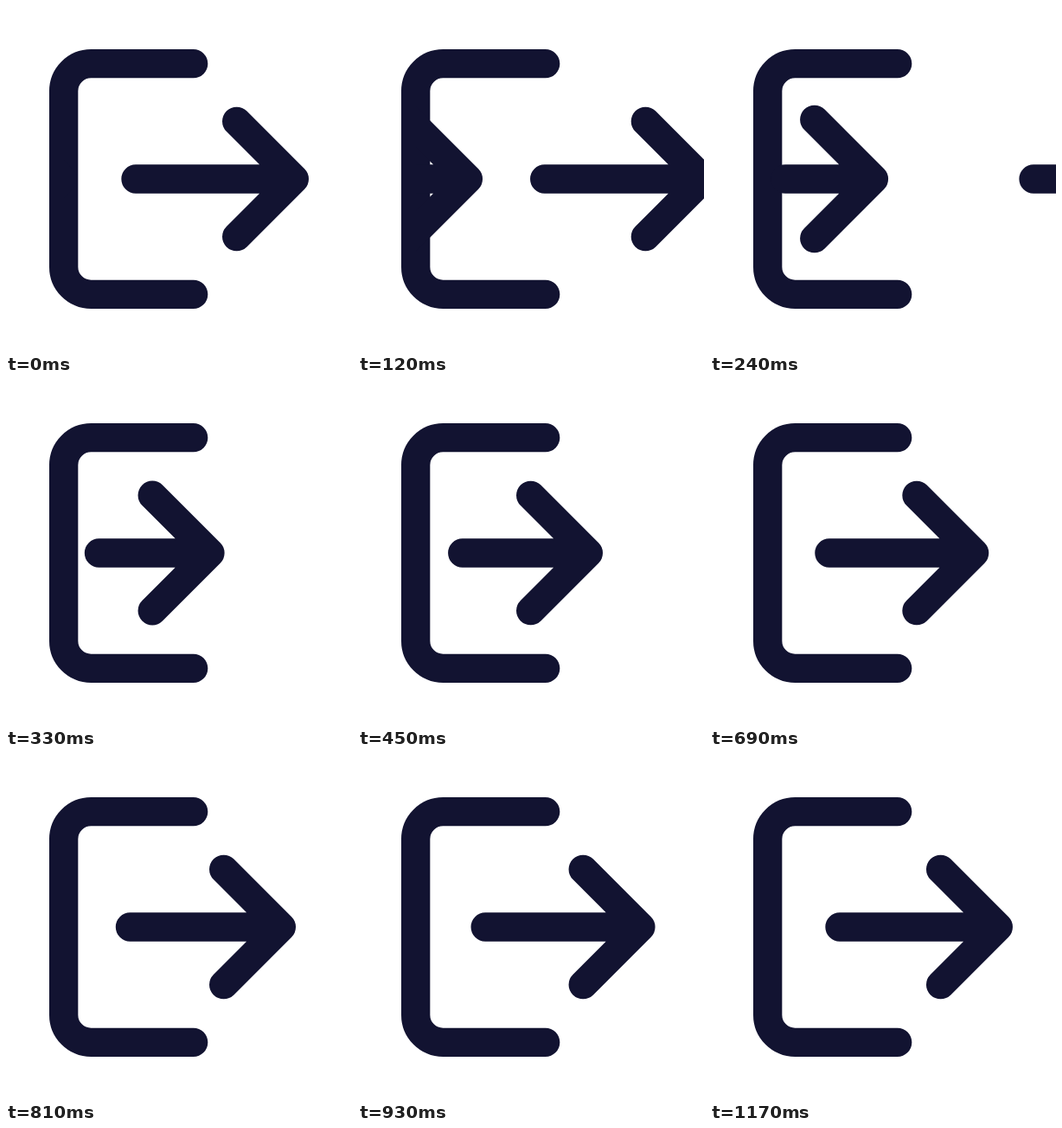
An HTML page that plays this animation: 400x400 px, repeating every 2230 ms.

```html
<!DOCTYPE html>
<html>
<head>
<meta charset="utf-8">
<style>
  html, body { margin: 0; width: 100%; height: 100%; overflow: hidden; background: #fff; }
  svg { display: block; width: 100%; height: 100%; }
</style>
</head>
<body>
<svg viewBox="0 0 400 400" fill="none" stroke="#121331" stroke-width="33.333" stroke-linecap="round" stroke-linejoin="round">
  <clipPath id="door"><path d="M67 0H400V400H67z"/></clipPath>
  <path d="M216.667 66.667H98.333A31.667 31.667 0 0 0 66.667 98.333V301.667A31.667 31.667 0 0 0 98.333 333.333H216.667"/>
  <g clip-path="url(#door)">
    <path id="leaving"/>
    <path id="entering"/>
  </g>
</svg>
<script>
const LOOP = 2230, STEP = 30, EXIT = 333, SETTLE = 1200;
const TAIL = 150, TIP = 333.333, ARM = 66.667;
const leaving = document.getElementById('leaving');
const entering = document.getElementById('entering');

const arrow = (tail, tip, arm) =>
  `M${tail} 200H${tip}M${tip - arm} ${200 - arm}L${tip} 200L${tip - arm} ${200 + arm}`;

function draw(t) {
  const shift = 400 * (t / EXIT) ** 1.77;
  leaving.setAttribute('d', t < EXIT ? arrow(TAIL + shift, TIP + shift, ARM) : '');

  // Steady entry, then a long ease-out; the tail lags less than the tip.
  const ease = 67 * (Math.max(0, SETTLE - t) / 750) ** 2.29;
  const gap = Math.max(268 - 0.517 * t, ease);
  const arm = ARM + Math.max(0, EXIT - t) * 0.0215;
  entering.setAttribute('d', arrow(TAIL - gap / 2.29, TIP - gap, arm));
}

const start = performance.now();
function tick() {
  const t = (performance.now() - start + 0.5) % LOOP;
  draw(Math.min(Math.floor(t / STEP) * STEP, SETTLE));
  requestAnimationFrame(tick);
}
tick();
</script>
</body>
</html>
```
